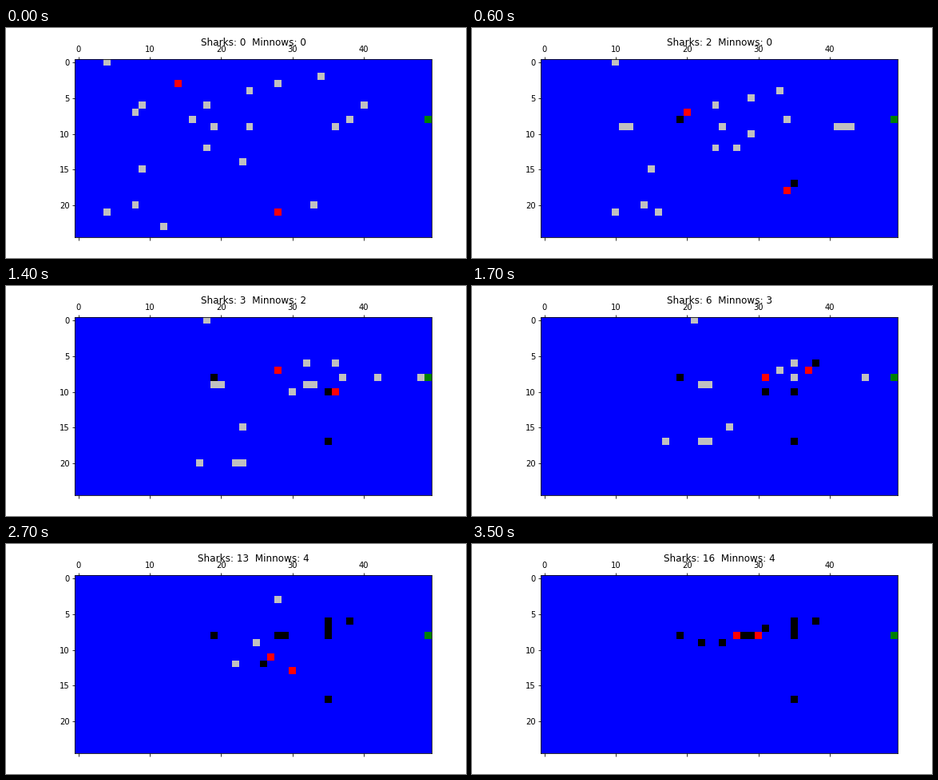
Recreate the animation shown at these times as a matplotlib script. Size 576 by 288 pixels, loop 3.6 s.

```python
import numpy as np
import matplotlib.pyplot as plt
from matplotlib.animation import FuncAnimation
from matplotlib.colors import ListedColormap

COLS, ROWS, STEPS = 50, 25, 36
WATER, MINNOW, SHARK, CAUGHT, GOAL = range(5)
COLORS = ListedColormap(["blue", "silver", "red", "black", "green"])
GOAL_CELL = (49, 8)
GATE = (48, 8)  # a minnow here reaches the goal on its next step
MOVES = {"R": (1, 0), "U": (0, -1), "D": (0, 1), "W": (0, 0)}

# Start cell and run-length route (W waits); one cell per step.
MINNOWS = [
    (4, 0, "R24 D7 R3"), (34, 2, "D6 R14"), (28, 3, "R5 D4 R4 D1"),
    (24, 4, "R5 D1 R7 D1 R2"), (18, 6, "R17"), (16, 8, "R3"),
    (19, 9, "R16 U1"), (24, 9, "R5 D1 R6"), (18, 12, "R9 U1 R3 U1 R1"),
    (23, 14, "R4 U4 R5 U3 R3"), (9, 6, "D3 R20 U1"),
    (8, 7, "D2 W1 R20 U1"), (40, 6, "D3 R8 U1"),
    (38, 8, "R1 W1 R1 D1 R8 U1"), (36, 9, "R3 W1 R9 U1"),
    (9, 15, "R22 U2"), (8, 20, "R14 U5 R4 U3"),
    (12, 23, "R4 U2 R3 U1 R4 U5 R2 U6"), (33, 20, "R2 U3"),
    (4, 21, "R13 U4 R5 U8"),
]

# Turning points; sharks also move diagonally, a repeated point is a pause.
SHARKS = [
    [(14, 3), (18, 7), (28, 7), (30, 9), (31, 8), (34, 8), (32, 10),
     (31, 10), (29, 9), (29, 9), (27, 11), (26, 10), (23, 10), (25, 8),
     (27, 8)],
    [(28, 21), (29, 20), (32, 20), (34, 18), (32, 16), (32, 14), (36, 10),
     (37, 9), (37, 7), (36, 7), (36, 7), (36, 9), (32, 13), (30, 13),
     (27, 13), (26, 12), (30, 8)],
]
SHARKS[0].remove((29, 9))


def swim(col, row, route):
    path = [(col, row)]
    for run in route.split():
        dx, dy = MOVES[run[0]]
        for _ in range(int(run[1:])):
            col, row = col + dx, row + dy
            path.append((col, row))
    return path


def hunt(points):
    path = [points[0]]
    for (x0, y0), (x1, y1) in zip(points, points[1:]):
        dx, dy = x1 - x0, y1 - y0
        n = max(abs(dx), abs(dy), 1)
        path += [(x0 + dx * i // n, y0 + dy * i // n) for i in range(1, n + 1)]
    return path


minnows = [swim(*m) for m in MINNOWS]
sharks = [hunt(s) for s in SHARKS]


def state(step):
    """Grid and both scores at a step; a shark wipes caught cells it crosses."""
    grid = np.full((ROWS, COLS), WATER)
    eaten = safe = 0
    for path in minnows:
        end = len(path)
        col, row = path[min(step, end - 1)]
        if step < end:
            grid[row, col] = MINNOW
        elif (col, row) == GATE:
            safe += 1
        else:
            eaten += 1
            if not any((col, row) in s[end:step + 1] for s in sharks):
                grid[row, col] = CAUGHT
    for path in sharks:
        col, row = path[step]
        grid[row, col] = SHARK
    grid[GOAL_CELL[1], GOAL_CELL[0]] = GOAL
    return grid, eaten, safe


fig = plt.figure(figsize=(8, 4), dpi=72)
ax = fig.add_axes([0.15, 0.09, 0.775, 0.775])
image = ax.matshow(state(0)[0], cmap=COLORS, vmin=0, vmax=4)
title = ax.set_title("", y=1.05, fontsize=12)


def update(step):
    grid, eaten, safe = state(step)
    image.set_data(grid)
    title.set_text(f"Sharks: {eaten}  Minnows: {safe}")
    return image, title


anim = FuncAnimation(fig, update, frames=STEPS, interval=100, repeat=True)
plt.show()
```
